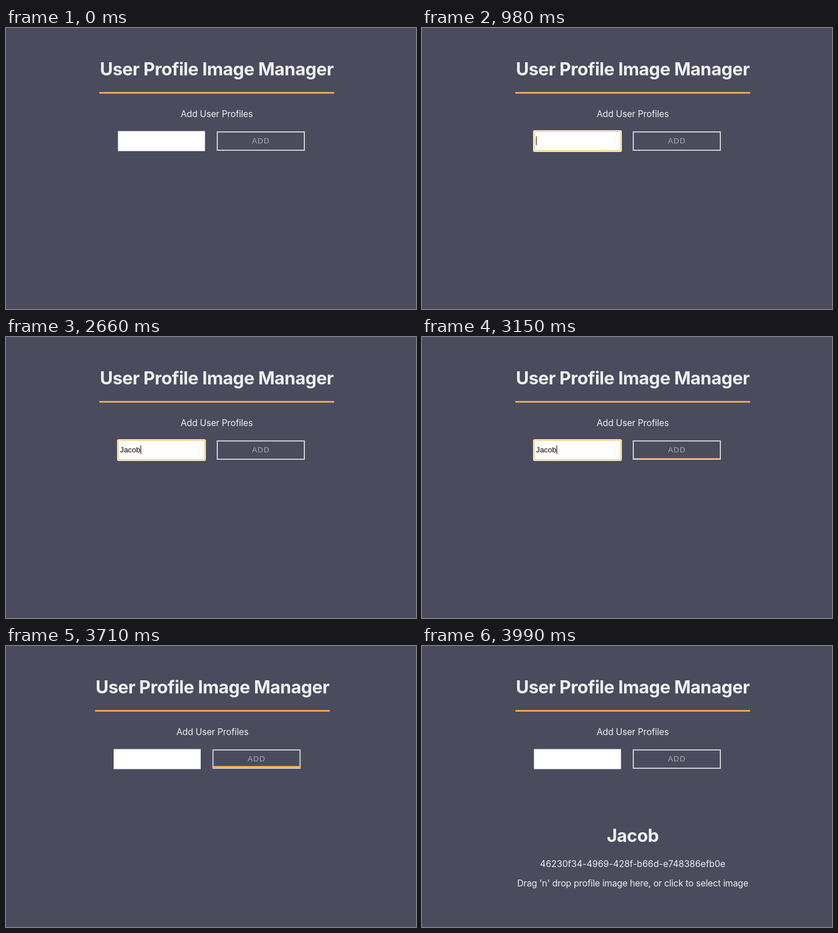
Recreate the animation shown at these times as an HTML page. Size 716 by 492 pixels, loop 4550 ms.

```html
<!DOCTYPE html>
<html lang="en">
<head>
<meta charset="utf-8">
<title>User Profile Image Manager</title>
<style>
  html, body { margin: 0; width: 100%; height: 100%; overflow: hidden; background: #4b4b5e; }
  svg { display: block; }
  text { font: 15.5px Inter, sans-serif; letter-spacing: -.13px; fill: #f0f0f2; text-anchor: middle; white-space: pre; }
  .big { font-size: 31px; font-weight: 700; letter-spacing: -.45px; }
  .id { letter-spacing: .05px; }
  .add, #typed { font: 13.333px "Liberation Sans", Arial, sans-serif; }
  .add { letter-spacing: 1px; fill: #aaaab4; }
  #typed { letter-spacing: 0; fill: #000; text-anchor: start; }
</style>
</head>
<body>
<svg width="716" height="492" viewBox="0 0 716 492">
  <g id="page">
    <text class="big" x="368" y="83">User Profile Image Manager</text>
    <rect x="163" y="112" width="410" height="3" fill="#f0a94f"/>
    <text x="368" y="156">Add User Profiles</text>

    <rect x="195.5" y="180.5" width="152" height="35" fill="#fff"/>
    <g id="focus">
      <rect x="194" y="179" width="155" height="38" rx="3" fill="#fff"/>
      <rect x="196" y="181" width="151" height="34" rx="1.5" fill="none" stroke="#e9c76f" stroke-width="1.5"/>
    </g>
    <text id="typed" x="199" y="202"></text>
    <rect id="caret" y="190" width="1" height="15"/>

    <rect id="bar" x="370" width="150" fill="#f0a94f"/>
    <rect x="369" y="182" width="152" height="32" fill="none" stroke="#cfcfd2" stroke-width="2"/>
    <text class="add" x="445" y="202">ADD</text>

    <g id="card">
      <text class="big" id="name" x="368" y="343"></text>
      <text class="id" x="368" y="387">46230f34-4969-428f-b66d-e748386efb0e</text>
      <text x="368" y="421">Drag 'n' drop profile image here, or click to select image</text>
    </g>
  </g>
</svg>
<script>
  const LOOP = 4550, STEP = 70, NAME = 'Jacob';
  const keyTimes = [1750, 2100, 2310, 2450, 2660];
  const $ = id => document.getElementById(id);
  const show = (id, on) => $(id).setAttribute('visibility', on ? 'visible' : 'hidden');
  const within = (t, from, to) => t >= from && t < to;

  // smooth 0..1 ramp lasting 250 ms
  function ramp(t, from) {
    const p = Math.min(1, Math.max(0, (t - from) / 250));
    return p * p * (3 - 2 * p);
  }

  function draw(now) {
    const t = Math.floor((now % LOOP) / STEP) * STEP;
    const focused = within(t, 980, 3290);
    const count = t < 3360 ? keyTimes.filter(k => t >= k).length : 0;

    $('typed').textContent = NAME.slice(0, count);
    const width = count ? $('typed').getComputedTextLength() : 0;
    $('caret').setAttribute('x', Math.round(199 + width));
    show('focus', focused);
    show('caret', focused && !within(t, 1470, 1750));

    const height = 3 * (ramp(t, 3060) - ramp(t, 3735));
    $('bar').setAttribute('y', 213 - height);
    $('bar').setAttribute('height', height);

    // the scrollbar briefly narrows the page before the card appears
    $('page').setAttribute('transform', `translate(${within(t, 3710, 3780) ? -7.5 : 0} 0)`);
    show('card', t >= 3780);
  }

  $('name').textContent = NAME;
  const start = performance.now();
  function tick() {
    draw(performance.now() - start);
    requestAnimationFrame(tick);
  }
  tick();
</script>
</body>
</html>
```
